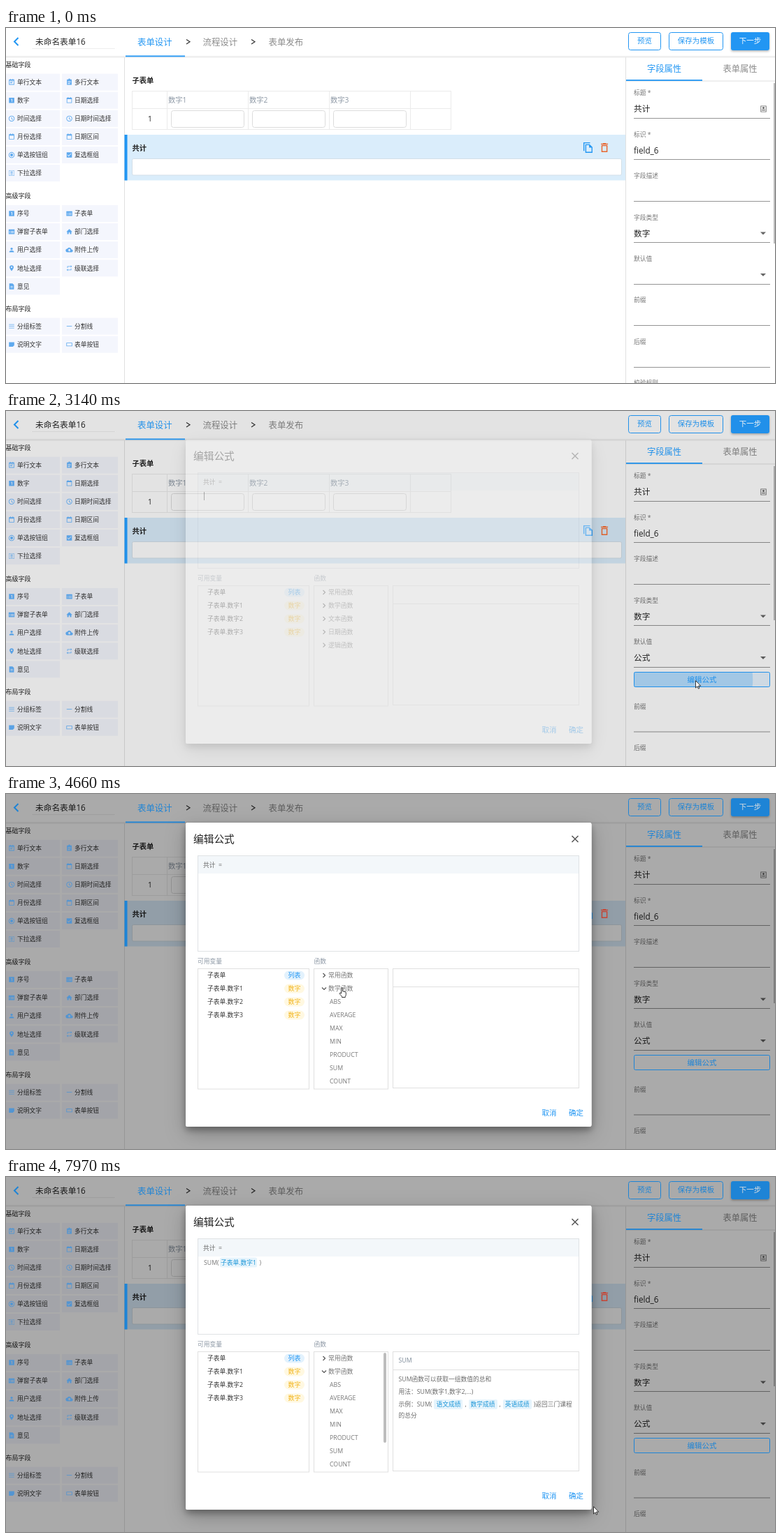
Write an HTML page that moves like this. It is 1100x509 px and loops after 8000 ms.

```html
<!DOCTYPE html>
<html lang="zh-CN">
<head>
<meta charset="utf-8">
<title>表单设计</title>
<style>
html, body { margin: 0; width: 100%; height: 100%; overflow: hidden; background: #fff; }
svg { display: block; width: 1100px; height: 509px; }
svg, .desc { font-family: "Open Sans", "Noto Sans CJK SC", "Noto Sans CJK", sans-serif; }
text { white-space: pre; }
.desc { font-size: 8.75px; line-height: 16px; color: #6a6a6a; }
.desc p { margin: 0 0 2px; }
.desc b { font-weight: 500; color: #1c96d8; background: #e6f4fc; border-radius: 2px; padding: 1px 3px; margin: 0 3px; }
</style>
</head>
<body>
<svg id="stage" viewBox="0 0 1100 509"></svg>
<script>
const LOOP = 8000, BLUE = '#2196f3', GREY = '#8d98a5', LINE = '#e0e0e0';
const stage = document.getElementById('stage');

function el(parent, tag, attrs = {}) {
  const node = document.createElementNS('http://www.w3.org/2000/svg', tag);
  set(node, attrs);
  return parent.appendChild(node);
}
function set(node, attrs) {
  for (const k in attrs) node.setAttribute(k, attrs[k]);
}
function show(node, on) {
  node.setAttribute('visibility', on ? 'inherit' : 'hidden');
}
const group = (parent, attrs) => el(parent, 'g', attrs);
const rect = (parent, x, y, width, height, fill, more) =>
  el(parent, 'rect', { x, y, width, height, fill, ...more });
const box = (parent, x, y, w, h, stroke, rx = 0, fill = 'none') =>
  rect(parent, x + .5, y + .5, w - 1, h - 1, fill, { stroke, rx });
const path = (parent, d, more) => el(parent, 'path', { d, fill: 'none', ...more });

// y is the middle of the line of text
function text(parent, str, x, y, size, fill, more) {
  const node = el(parent, 'text', { x, y: y + size * .37, 'font-size': size, fill, ...more });
  node.textContent = str;
  return node;
}
const mid = { 'text-anchor': 'middle' };
const bold = { 'font-weight': 700 };

const ICONS = {
  line: 'M7 1v2H3v18h18V3h-4V1h-2v2H9V1zM5 7h14v12H5zM7 9h10v2H7zM7 13h7v2H7z',
  clip: 'M4 3h5a3 3 0 0 1 6 0h5v18H4zM7 8h10v2H7zM7 12h10v2H7zM7 16h7v2H7z',
  one: 'M3 3h18v18H3zM10 7h4v10h-2V9h-2z',
  cal: 'M7 1v2H3v18h18V3h-4V1h-2v2H9V1zM5 8h14v11H5z',
  clock: 'M12 2a10 10 0 1 0 .01 0zM12 4a8 8 0 1 1-.01 0zM11 7h2v5l4 3-1 1.500-5-3.500z',
  radio: 'M12 2a10 10 0 1 0 .01 0zM12 4a8 8 0 1 1-.01 0zM12 7a5 5 0 1 0 .01 0z',
  check: 'M3 3h18v18H3zM10 17l9-9-1.400-1.400L10 14.200l-3.600-3.600L5 12z',
  drop: 'M3 3h18v18H3zM4 4h16v16H4zM8 7h8v2H8zM8 11h8v2H8zM8 15h8v2H8z',
  card: 'M2 4h20v16H2zM4 10h3v2H4zM9 10h11v2H9zM4 14h3v2H4zM9 14h11v2H9z',
  home: 'M10 20v-6h4v6h5v-8h3L12 3 2 12h3v8z',
  user: 'M12 12a4 4 0 1 0 0-8 4 4 0 0 0 0 8zm0 2c-2.700 0-8 1.300-8 4v2h16v-2c0-2.700-5.300-4-8-4z',
  cloud: 'M19.400 10a7.500 7.500 0 0 0-14-2A6 6 0 0 0 6 20h13a5 5 0 0 0 .4-10zM14 13v4h-4v-4H7l5-5 5 5z',
  pin: 'M12 2a7 7 0 0 0-7 7c0 5.300 7 13 7 13s7-7.700 7-13a7 7 0 0 0-7-7zm0 4.500a2.500 2.500 0 1 1 0 5 2.500 2.500 0 0 1 0-5z',
  swap: 'M7 7h10v3l4-4-4-4v3H5v6h2zM17 17H7v-3l-4 4 4 4v-3h12v-6h-2z',
  doc: 'M4 2h11l5 5v15H4zM8 11h8v2H8zM8 15h8v2H8z',
  rows: 'M3 5h18v2H3zM3 11h18v2H3zM3 17h18v2H3z',
  minus: 'M3 11h18v2H3z',
  note: 'M3 4h18v11l-5 5H3z',
  button: 'M2 6h20v12H2zM4 8h16v8H4z',
  copy: 'M16 1H2v18h2V3h12zM15 5H6v18h15V11zM8 7h6v5h5v9H8z',
  trash: 'M15.500 4l-1-1h-5l-1 1H5v2h14V4zM6 7v14h12V7zM8 9h8v10H8z',
  badge: 'M3 2h18v20H3zM5 4h14v16H5zM9 6h6v6H9zM7 14h10v3H7z'
};
const icon = (parent, name, x, y, scale, fill) =>
  path(parent, ICONS[name], { fill, 'fill-rule': 'evenodd', transform: `translate(${x} ${y}) scale(${scale})` });

const defs = el(stage, 'defs');
defs.innerHTML = `
  <filter id="soft" x="-20%" y="-20%" width="140%" height="140%"><feDropShadow dx="0" dy="1.500" stdDeviation="1.500" flood-opacity=".3"/></filter>
  <filter id="deep" x="-15%" y="-15%" width="130%" height="135%">
    <feDropShadow in="SourceGraphic" dx="0" dy="5" stdDeviation="5" flood-opacity=".3" result="near"/>
    <feDropShadow in="SourceGraphic" dx="0" dy="9" stdDeviation="14" flood-opacity=".25" result="far"/>
    <feMerge><feMergeNode in="far"/><feMergeNode in="near"/></feMerge>
  </filter>
  <clipPath id="itemClip"><rect x="898" y="444.500" width="195" height="35"/></clipPath>
  <clipPath id="editClip"><rect x="898" y="374" width="195" height="22" rx="2"/></clipPath>`;

const page = group(stage);
const dim = rect(stage, 0, 0, 1100, 509, '#000');
const accent = group(stage);

// header
rect(page, 0, 0, 1100, 509, '#fff');
rect(page, 0, 40.5, 1100, 1, '#dedede');
rect(page, 0, 41.5, 1100, 1.5, '#f3f3f3');
path(accent, 'M17.500 14l-5.500 5.500 5.500 5.500', { stroke: BLUE, 'stroke-width': 2 });
text(page, '未命名表单16', 42, 19.5, 11.7, '#222');
path(page, 'M38 29.500H155', { stroke: '#ddd', 'stroke-dasharray': '1 1' });
text(accent, '表单设计', 188, 20, 12.4, BLUE);
rect(accent, 171, 39.5, 85, 1.8, BLUE);
text(page, '流程设计', 281.5, 20, 12.4, '#8a8a8a');
text(page, '表单发布', 375.5, 20, 12.4, '#8a8a8a');
for (const x of [258, 351]) path(page, `M${x} 16.500l5 3.300-5 3.300`, { stroke: '#333', 'stroke-width': 1.2 });
for (const [str, x, w] of [['预览', 890, 47], ['保存为模板', 948, 78]]) {
  box(accent, x, 6, w, 26, BLUE, 3);
  text(accent, str, x + w / 2, 18.5, 10.5, BLUE, mid);
}
rect(accent, 1037, 6, 55, 26, BLUE, { rx: 3, filter: 'url(#soft)' });
text(accent, '下一步', 1064.5, 18.5, 10.5, '#fff', mid);

// field palette
const PALETTE = [
  ['基础字段', 53, 77.6, 'line 单行文本 clip 多行文本 one 数字 cal 日期选择 clock 时间选择 clock 日期时间选择 cal 月份选择 cal 日期区间 radio 单选按钮组 check 复选框组 drop 下拉选择'],
  ['高级字段', 241, 266, 'one 序号 card 子表单 card 弹窗子表单 home 部门选择 user 用户选择 cloud 附件上传 pin 地址选择 swap 级联选择 doc 意见'],
  ['布局字段', 403, 427.6, 'rows 分组标签 minus 分割线 note 说明文字 button 表单按钮']
];
for (const [title, titleY, top, list] of PALETTE) {
  text(page, title, -.5, titleY, 9, '#222');
  const words = list.split(' ');
  for (let i = 0; i < words.length / 2; i++) {
    const right = i % 2, y = top + (i >> 1) * 26.1;
    rect(page, right ? 80 : 0, y - 12, right ? 80 : 77, 24, '#f4f6fd');
    icon(accent, words[2 * i], right ? 85.5 : 3, y - 5, .42, '#5ea9ee');
    text(page, words[2 * i + 1], right ? 98 : 16, y, 8.75, '#333');
  }
}
rect(page, 169, 42, 1, 467, LINE);

// canvas with the subform and the selected field
text(page, '子表单', 180.5, 75, 10.3, '#222', bold);
box(page, 180, 90, 457, 56, '#ebebeb');
rect(page, 181, 115, 455, 1, '#ebebeb');
for (const x of [230, 346, 462, 578]) rect(page, x, 90, 1, 56, '#ebebeb');
for (let i = 0; i < 3; i++) {
  text(page, '数字' + (i + 1), 232 + 116 * i, 103, 10.3, GREY);
  box(page, 236 + 116 * i, 118, 105, 25, '#dcdcdc', 3, '#fff');
}
text(page, '1', 206, 130.5, 10.3, '#222', mid);
rect(page, 170, 153, 716, 65.5, '#daedfb');
rect(accent, 169.5, 153, 4, 65.5, BLUE);
text(page, '共计', 180.5, 172, 10.3, '#222', bold);
box(page, 180, 187, 701, 24.5, '#d3dfe8', 2, '#fff');
icon(accent, 'copy', 824.6, 163.3, .68, BLUE);
const trash = icon(accent, 'trash', 847.4, 162.8, .72, '#e8662e');

// property panel
rect(page, 886, 42, 1, 467, LINE);
text(accent, '字段属性', 941.5, 58, 12.3, BLUE, mid);
text(page, '表单属性', 1050, 58, 12.3, '#8a8a8a', mid);
rect(page, 887, 75.5, 213, 1, LINE);
rect(accent, 887, 74, 109, 1.8, BLUE);
const thumb = rect(page, 1098, 79, 2, 230, '#bdbdbd');

const lower = group(page);
const FIELDS = [['标题 *', '共计'], ['标识 *', 'field_6'], ['字段描述'], ['字段类型', '数字'], ['默认值'], ['前缀'], ['后缀'], ['校验规则']];
let defaultLabel;
FIELDS.forEach(([label, value], i) => {
  const home = i > 4 ? lower : page, y = 93 + 59.45 * i;
  const node = text(home, label, 898, y, 8.75, '#757575');
  if (i === 4) defaultLabel = node;
  if (value) text(home, value, 898, y + 23, 11.7, '#222');
  rect(home, 898, Math.round(y + 36), 195, 1, '#949494');
});
icon(page, 'badge', 1078, 110.5, .46, '#666');
const TRIANGLE = 'M-4-2h8l-4 4z';
path(page, TRIANGLE, { fill: '#666', transform: 'translate(1083 294.500)' });
const arrow = path(page, TRIANGLE, { fill: '#666' });
const chosen = text(page, '公式', 898, 354, 11.7, '#222');
const clear = path(page, 'M1058.500 350l8 8m0-8l-8 8', { stroke: '#666', 'stroke-width': 1.3 });
const hoverLine = rect(page, 898, 367, 195, 1, '#222');
const focusLine = rect(page, 898, 366.5, 195, 2, BLUE);

const edit = group(accent);
const editTint = rect(edit, 898, 374, 195, 22, BLUE, { rx: 2 });
const editRipple = el(group(edit, { 'clip-path': 'url(#editClip)' }), 'circle', { cx: 980, cy: 385, fill: BLUE });
box(edit, 898, 374, 195, 22, BLUE, 2);
text(edit, '编辑公式', 995.5, 385, 10.5, BLUE, mid);

// drop-down list
const menu = group(stage);
rect(menu, 898, 374.5, 195, 105, '#fff', { rx: 2, filter: 'url(#soft)' });
const menuHover = rect(menu, 898, 374.5, 195, 35, '#dfe5ea');
const menuRipple = el(group(menu, { 'clip-path': 'url(#itemClip)' }), 'circle', { cx: 961, cy: 462, fill: '#000' });
['无', '自定义', '公式'].forEach((str, i) => text(menu, str, 910, 392 + 35 * i, 11.7, '#444'));

// formula dialog
const dialog = group(stage);
rect(dialog, 257, 41, 580.5, 436, '#fff', { rx: 3, filter: 'url(#deep)' });
text(dialog, '编辑公式', 268, 65, 14.7, '#222');
path(dialog, 'M809.500 60l9 9m0-9l-9 9', { stroke: '#555', 'stroke-width': 1.5 });
box(dialog, 274, 88, 546, 138, '#dfe2e5');
rect(dialog, 275, 89, 544, 25, '#f3f7fa');
text(dialog, '共计  =', 282, 101.5, 8.75, '#666');
text(dialog, '可用变量', 274, 240, 8.75, GREY);
text(dialog, '函数', 440.5, 240, 8.75, GREY);
box(dialog, 274, 250, 160, 173.5, LINE);
box(dialog, 440, 250, 107, 173.5, LINE);
box(dialog, 553, 250, 267, 172, LINE);
rect(dialog, 554, 276, 265, 1, LINE);
['子表单', '子表单.数字1', '子表单.数字2', '子表单.数字3'].forEach((str, i) => {
  const y = 260 + 19 * i;
  text(dialog, str, 288, y, 8.75, '#333');
  rect(dialog, 398, y - 6.5, 29, 13, i ? '#fff8e1' : '#e3f2fd', { rx: 6.5 });
  text(dialog, i ? '数字' : '列表', 412.5, y, 9, i ? '#f2b41c' : BLUE, { ...mid, 'font-weight': 500 });
});
text(dialog, '取消', 766.5, 457.5, 10.5, BLUE);
text(dialog, '确定', 805, 457.5, 10.5, BLUE);

const ROW = 18.9;
function category(parent, str, y, open) {
  path(parent, open ? `M452 ${y - 1.5}l3 3 3-3` : `M453.500 ${y - 3}l3 3-3 3`, { stroke: '#555', 'stroke-width': 1.2 });
  text(parent, str, 461, y, 8.9, '#777');
}
category(dialog, '常用函数', 260);
const folded = group(dialog), unfolded = group(dialog);
['数学函数', '文本函数', '日期函数', '逻辑函数'].forEach((str, i) => category(folded, str, 279 + ROW * i));
const rowHover = rect(unfolded, 441, 0, 105, ROW, '#e5f3f4');
category(unfolded, '数学函数', 279, true);
const FUNCS = ['ABS', 'AVERAGE', 'MAX', 'MIN', 'PRODUCT', 'SUM', 'COUNT'];
FUNCS.forEach((str, i) => text(unfolded, str, 463, 298 + ROW * i, 8.75, '#777'));
const listBar = rect(unfolded, 540, 252, 4, 129, '#bdbdbd', { rx: 2 });

const GRADES = ['语文成绩', '数学成绩', '英语成绩'];
const HELP = {
  ABS: ['一个数的绝对值', '数字', ['数字'], '返回数字的绝对值'],
  AVERAGE: ['一组数值的平均值', '', GRADES, '返回三门课程的平均分'],
  MAX: ['一组数值的最大值', '', GRADES, '返回三门课程中的最高分'],
  MIN: ['一组数值的最大值', '', GRADES, '返回三门课程中的最低分'],
  PRODUCT: ['一组数值的乘积', '', ['单价', '数量'], '返回总价'],
  SUM: ['一组数值的总和', '', GRADES, '返回三门课程的总分'],
  COUNT: ['参数的数量', '', GRADES, '返回3']
};
const helpTitle = text(dialog, '', 561.5, 263, 8.75, '#7d8b99');
const holder = el(dialog, 'foreignObject', { x: 561.5, y: 282, width: 253, height: 130 });
const helpBody = holder.appendChild(document.createElement('div'));
helpBody.className = 'desc';
let helpName = '';
function setHelp(name) {
  if (name === helpName) return;
  helpName = name;
  helpTitle.textContent = name;
  if (!name) { helpBody.innerHTML = ''; return; }
  const [what, args, tags, result] = HELP[name];
  helpBody.innerHTML = `<p>${name}函数可以获取${what}</p><p>用法：${name}(${args || '数字1,数字2,...'})</p>` +
    `<p>示例：${name}(${tags.map(s => `<b>${s}</b>`).join(',')})${result}</p>`;
}

const emptySum = text(dialog, 'SUM()', 283, 122.5, 8.75, '#777');
const fullSum = group(dialog);
text(fullSum, 'SUM(', 283, 122.5, 8.75, '#777');
rect(fullSum, 306, 115.5, 53, 14, '#e6f4fc', { rx: 2 });
text(fullSum, '子表单.数字1', 307, 122.5, 8.75, '#1c96d8', { 'font-weight': 500 });
text(fullSum, ')', 362.5, 122.5, 8.75, '#777');
const caret = rect(dialog, 0, 116, 1, 12, '#333');

// pointer
const pointer = group(stage);
const ink = { fill: '#fff', stroke: '#222', 'stroke-width': .9, 'stroke-linejoin': 'round' };
const arrowShape = path(pointer, 'M.5.500v10.500l2.400-2.200 1.500 3.400 1.500-.700-1.500-3.300h3.300z', ink);
const handShape = path(pointer, 'M3.500 9V2q0-1.200 1-1.200t1 1.200v4q1.300-.700 1.700.400 1.300-.500 1.600.500 1.500-.300 1.500.800v3q0 1.500-1 2.500v1.300H4.500v-1.300L1.200 9.500q-.4-1.300.8-1.400z', ink);

// time, x, y, and whether it is a hand from then on
const TRACK = [
  [260, 1012, 474, 0], [750, 998, 352, 1], [1100, 998, 352, 1], [1580, 958, 445, 1],
  [1840, 958, 445, 1], [1910, 958, 451, 1], [2390, 958, 451, 0], [2800, 985, 384, 1],
  [3075, 986, 386, 0], [3280, 986, 386, 0], [3770, 510, 352, 0], [4100, 490, 305, 1],
  [4460, 476, 277, 1], [4730, 476, 277, 1], [5430, 485, 379, 1], [5500, 486, 387, 1],
  [5570, 486, 394, 1], [5640, 485, 389, 1], [6130, 485, 389, 1], [6270, 452, 357, 1],
  [6410, 392, 320, 0], [6500, 354, 299, 1], [6540, 339, 290, 1], [6820, 321, 273, 1],
  [7290, 321, 273, 0], [7480, 445, 388, 1], [7570, 530, 394, 0], [7830, 853, 488, 0], [7960, 840, 472, 0]
];
const clamp = v => Math.max(0, Math.min(1, v));
const ramp = (t, from, to) => clamp((t - from) / (to - from));
const easeOut = k => 1 - (1 - k) ** 3;

function pointerAt(t) {
  let i = 0;
  while (i < TRACK.length - 1 && TRACK[i + 1][0] <= t) i++;
  const a = TRACK[i], b = TRACK[i + 1] || a;
  const k = a === b ? 0 : ramp(t, a[0], b[0]);
  return { x: a[1] + (b[1] - a[1]) * k, y: a[2] + (b[2] - a[2]) * k, hand: a[3] };
}
function funcAt({ x, y }) {
  const i = Math.floor((y + 1 - 288.6) / ROW);
  return x > 441 && x < 546 && i >= 0 && i < FUNCS.length ? i : -1;
}
function lastFunc(t) {
  for (let s = t; s > 4660; s -= 10) {
    const i = funcAt(pointerAt(s));
    if (i >= 0) return FUNCS[i];
  }
  return '';
}
function ripple(node, t, start, reach, strength) {
  set(node, {
    r: 20 + (reach - 20) * easeOut(ramp(t, start, start + 225)),
    opacity: t < start ? 0 : strength * (1 - ramp(t, start + 225, start + 450))
  });
}
function caretX(t) {
  const [start, x] = t >= 7220 ? [7220, 360.5] : t >= 5860 ? [5860, 306] : [3120, 283];
  const focused = t >= 3120 && (t < 4530 || t >= 5860);
  return focused && Math.floor((t - start) / 530) % 2 === 0 ? x : null;
}

function draw(t) {
  const p = pointerAt(t);
  const focused = t >= 890 && t < 3000, picked = t >= 2170;

  // default value field
  defaultLabel.setAttribute('fill', focused ? BLUE : '#757575');
  const grow = 195 * easeOut(ramp(t, 890, 1250));
  set(focusLine, { x: 995.5 - grow / 2, width: grow });
  show(focusLine, focused);
  show(hoverLine, t >= 610 && t < 1250);
  show(chosen, picked);
  show(clear, picked && focused);
  const turn = 180 * (ramp(t, 890, 1170) - ramp(t, 2170, 2450));
  arrow.setAttribute('transform', `translate(1083 354) rotate(${turn})`);
  lower.setAttribute('transform', `translate(0 ${picked ? 33.5 : 0})`);
  thumb.setAttribute('height', picked ? 221 : 230);
  show(edit, picked);
  editTint.setAttribute('opacity', t > 2750 && t < 3280 ? .1 : 0);
  ripple(editRipple, t, 3000, 92, .25);

  // drop-down list
  const menuAlpha = ramp(t, 930, 1180) * (1 - ramp(t, 2170, 2400));
  menu.setAttribute('opacity', menuAlpha);
  show(menu, menuAlpha > 0);
  const item = Math.floor((p.y + 1 - 374.5) / 35);
  show(menuHover, menuAlpha > 0 && item >= 0 && item < 3);
  menuHover.setAttribute('y', 374.5 + 35 * Math.max(0, item));
  ripple(menuRipple, t, 2110, 97, .2);

  // dialog
  const open = ramp(t, 3050, 3330);
  dim.setAttribute('opacity', .335 * open);
  accent.style.filter = open ? `brightness(${1 - .12 * open})` : 'none';
  trash.setAttribute('fill', open === 1 ? '#e8503c' : '#e8662e');
  dialog.setAttribute('opacity', open);
  show(dialog, open > 0);
  const expanded = t >= 4655;
  show(folded, !expanded);
  show(unfolded, expanded);
  show(listBar, t >= 4730);
  const row = expanded ? funcAt(p) : -1;
  show(rowHover, row >= 0);
  rowHover.setAttribute('y', 288.6 + ROW * Math.max(0, row));
  setHelp(lastFunc(t));
  show(emptySum, t >= 5860 && t < 7220);
  show(fullSum, t >= 7220);
  const cx = caretX(t);
  show(caret, cx !== null);
  if (cx !== null) caret.setAttribute('x', cx);

  // pointer
  show(pointer, t >= 260);
  pointer.setAttribute('transform', `translate(${p.x} ${p.y})`);
  show(handShape, p.hand);
  show(arrowShape, !p.hand);
}

const begin = performance.now();
function frame() {
  draw((performance.now() - begin) % LOOP);
  requestAnimationFrame(frame);
}
frame();
</script>
</body>
</html>
```
